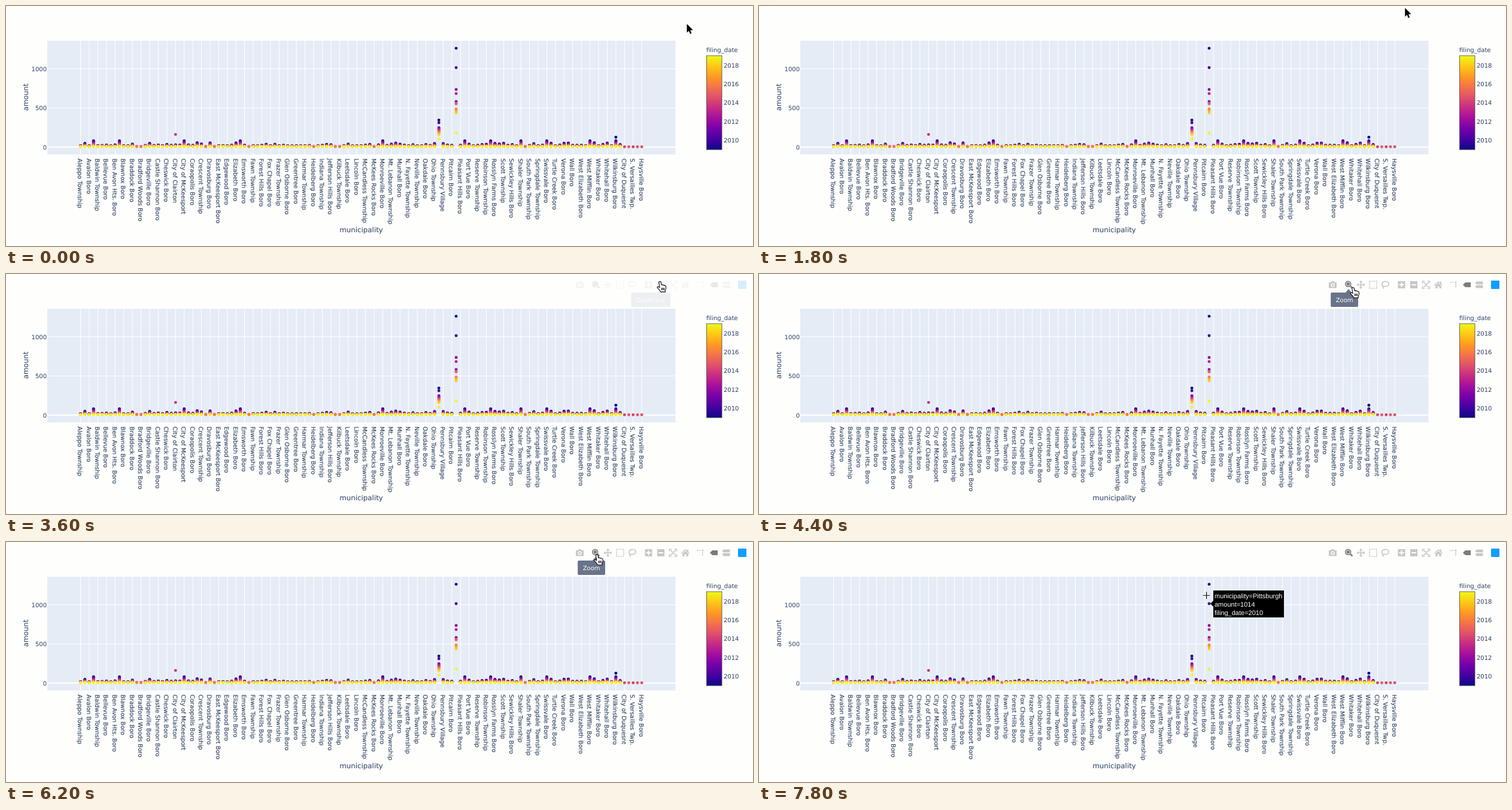
Animation of 1248 by 401 pixels, one loop 8000 ms. Source, as an HTML page:

```html
<!DOCTYPE html>
<html lang="en">
<head>
<meta charset="utf-8">
<title>Filings by municipality</title>
<style>
  html, body { margin: 0; width: 100%; height: 100%; overflow: hidden; background: #fefefd; }
  svg { display: block; width: 1248px; height: 401px; font: 10px "DejaVu Sans", sans-serif; fill: #2a3f5f; text-rendering: geometricPrecision; }
  .title { font-size: 11.85px; text-anchor: middle; }
  .names { font-size: 9.95px; stroke: #2a3f5f; stroke-width: .12px; }
  .icon { fill: #c7c7c7; }
  .icon .line { fill: none; stroke: #c7c7c7; stroke-width: 1.7; }
  .icon.on { fill: #7c7c7c; }
  .hover { font: 11px "Liberation Sans", Arial, sans-serif; fill: #fff; }
</style>
</head>
<body>
<svg id="stage" viewBox="0 0 1248 401">
  <defs><linearGradient id="plasma" x1="0" y1="1" x2="0" y2="0"></linearGradient></defs>
  <rect x="69" y="58" width="1049.5" height="190" fill="#e5ecf6"/>
  <g id="grid" stroke="#fff"></g>
  <g id="dots"></g>
  <g id="names" class="names"></g>
  <g id="scale"></g>
  <text class="title" x="593.5" y="378">municipality</text>
  <text class="title" transform="translate(37.3 152.5) rotate(-90)">amount</text>
  <text x="1170" y="77" font-size="10.1">filing_date</text>
  <rect x="1170.5" y="83" width="25.5" height="157" fill="url(#plasma)" stroke="#444" stroke-width=".8"/>
  <g id="bar"></g>
  <g id="tip">
    <path id="tipArrow" fill="#69738a" d="M-6 32L0 25L6 32Z"/>
    <rect id="tipBox" y="31" height="24" rx="2" fill="#69738a"/>
    <text id="tipText" y="47" fill="#fff" text-anchor="middle"></text>
  </g>
  <g id="hover" class="hover">
    <path d="M754 103L759 98V81H877V126H759V108Z" fill="#000"/>
    <text x="761" y="93.5">municipality=Pittsburgh</text>
    <text x="761" y="107.5">amount=1014</text>
    <text x="761" y="122">filing_date=2010</text>
  </g>
  <g id="cursor">
    <path id="arrow" d="M0 0V14.6L3.3 11.5L5.6 16.7L7.9 15.7L5.7 10.6L10.3 10.3Z" fill="#000" stroke="#fff" paint-order="stroke"/>
    <path id="hand" d="M-1.8 1.2Q0 -1 1.7 1.2L2.6 5.8Q4.2 4.6 5.2 6.2Q7 5.2 7.8 7Q9.6 6.4 10 8.4Q10.6 12 8.8 14.6V17.4H1.4Q-.6 13.8 -4.2 10.6Q-5 8.6 -3 8.6L-.4 10Z M3 10.5V14.5M5 10.5V14.5M7 10.5V14.5" fill="#fff" stroke="#000" stroke-width="1.1" stroke-linejoin="round"/>
    <g id="cross" fill="none">
      <path d="M-6.5 0H6.5M0 -6.5V6.5" stroke="#fff" stroke-width="2.6"/>
      <path d="M-6 0H6M0 -6V6" stroke="#000" stroke-width="1.2"/>
    </g>
  </g>
</svg>
<script>
const $ = id => document.getElementById(id);
const show = (id, on) => { $(id).style.display = on ? '' : 'none'; };
const columnX = i => 124.6 + i * 7.212;
const amountY = amount => 235.8 - amount * .131;

// Every second column is labelled: B = Boro, T = Township.
const names = `Aleppo T,Avalon B,Baldwin T,Bellevue B,Ben Avon Hts. B,Blawnox B,Braddock B,Bradford Woods B,
Bridgeville B,Castle Shannon B,Cheswick B,City of Clairton,City of McKeesport,Coraopolis B,Crescent T,Dravosburg B,
East McKeesport B,Edgewood B,Elizabeth B,Emsworth B,Fawn T,Forest Hills B,Fox Chapel B,Frazer T,Glen Osborne B,
Greentree B,Harmar T,Heidelberg B,Indiana T,Jefferson Hills B,Kilbuck T,Leetsdale B,Lincoln B,McCandless T,
McKees Rocks B,Monroeville B,Mt. Lebanon T,Munhall B,N. Fayette T,Neville T,Oakdale B,Ohio T,Pennsbury Village,
Pitcairn B,Pleasant Hills B,Port Vue B,Reserve T,Robinson T,Rosslyn Farms B,Scott T,Sewickley Hills B,Shaler T,
South Park T,Springdale T,Swissvale B,Turtle Creek B,Verona B,Wall B,West Elizabeth B,West Mifflin B,Whitaker B,
Whitehall B,Wilkinsburg B,City of Duquesnt,S. Versailles Twp.,Haysville B`
  .split(/,\s*/).map(n => n.replace(/ B$/, ' Boro').replace(/ T$/, ' Township'));

$('names').innerHTML = names.map((n, i) =>
  `<text transform="translate(${columnX(2 * i) - 4.5} 254.8) rotate(90)">${n}</text>`).join('');
$('grid').innerHTML =
  names.map((n, i) => `<path d="M${columnX(2 * i)} 58V248"/>`).join('') +
  [0, 500, 1000].map(v => `<path d="M69 ${amountY(v)}H1118.5" stroke-width="${v ? 1 : 1.9}"/>`).join('');

// Year colours
const stops = ['#0d0887', '#4600a2', '#7500aa', '#a30e9f', '#c72a86', '#e0506a', '#f5724b', '#ff9a22', '#ffc814', '#f0f91b'];
const channels = hex => [1, 3, 5].map(k => parseInt(hex.slice(k, k + 2), 16));
function yearColor(year) {
  const p = (year - 2009) * .9, k = Math.min(8, Math.floor(p));
  const a = channels(stops[k]), b = channels(stops[k + 1]);
  return `rgb(${a.map((v, c) => Math.round(v + (b[c] - v) * (p - k)))})`;
}
$('plasma').innerHTML = stops.map((c, k) => `<stop offset="${k / 9}" stop-color="${c}"/>`).join('');
$('scale').innerHTML =
  [2010, 2012, 2014, 2016, 2018].map(y => `<text x="1199" y="${228.2 - (y - 2010) * 15.7}">${y}</text>`).join('') +
  [0, 500, 1000].map(v => `<text x="68" y="${amountY(v) + 3.8}" text-anchor="end">${v}</text>`).join('');

// Small towns get seeded amounts that decay by year; a few towns stand out.
const COLUMNS = 131, PENN = 83, CITY = 87;
const tall = new Set([3, 9, 24, 37, 70, 89, 95, 102, 108, 118, 124]);
const random = seed => Math.abs(Math.sin(seed * 12.9898) * 43758.5453) % 1;
const dot = (i, amount, year) =>
  `<circle cx="${columnX(i)}" cy="${amountY(amount)}" r="2.45" fill="${yearColor(year)}"/>`;

function town(i) {
  if (i > 125) return dot(i, 4, 2014 + random(i));
  const late = !tall.has(i) && random(i + 500) < .16;
  const peak = tall.has(i) ? 75 : late ? 4 : 12 + 38 * random(i) ** 3;
  let out = '';
  for (let k = late ? 5 : 0; k <= (late ? 7 : 10); k++)
    out += dot(i, 6 + peak * (1 - k / 10) ** 1.4, 2009 + k);
  return out;
}
const series = (i, amounts) => amounts.map((a, k) => dot(i, a, 2009 + k)).join('');
const cityAmounts = [1261, 1014, 580, 735, 683, 563, 552, 485, 465, 438, 182];
const pennAmounts = Array.from({ length: 11 }, (_, k) => k < 2 ? 345 - 34 * k : 246 - 12 * (k - 2) - (k === 10 ? 48 : 0));

$('dots').innerHTML =
  Array.from({ length: COLUMNS }, (_, i) => i === PENN || i === CITY ? '' : town(i)).join('') +
  dot(22, 162, 2013.6) + dot(124, 126, 2009) + series(PENN, pennAmounts) + series(CITY, cityAmounts);

// Toolbar: groups of evenly spaced buttons
const line = d => `<path class="line" d="${d}"/>`;
const solid = d => `<path fill-rule="evenodd" d="${d}"/>`;
const groups = [
  [958.5, [['Download plot as a png', solid('M-6.5 -4H-3L-2 -6H2L3 -4H6.5V5.5H-6.5ZM0 -2.8A3.3 3.3 0 1 0 .1 -2.8Z') + '<circle cy=".6" r="1.8"/>']]],
  [985, [
    ['Zoom', '<circle cx="-.8" cy="-1.2" r="5.3"/>' + solid('M2 3L4 1.2L7.3 5L5.5 6.5Z') + '<circle cx="-.8" cy="-1.2" r="3.3" fill="none" stroke="#fefefd" stroke-width=".9"/>', 'on'],
    ['Pan', line('M-5 0H5M0 -5V5') + solid('M-7 0L-4 -3V3ZM7 0L4 -3V3ZM0 -7L-3 -4H3ZM0 7L-3 4H3Z')],
    ['Box Select', '<rect class="line" x="-6" y="-6" width="12" height="12" stroke-dasharray="2 1.43"/>'],
    ['Lasso Select', line('M-3.5 3C-8 -1 -5 -6 1 -5.5C7 -5 7 1 2 2.5C-1 3.5 -4 1.5 -4.5 3.5Q-4 5 -3 6.5')]]],
  [1073.5, [
    ['Zoom in', solid('M-6 -6H6V6H-6ZM-1 -4V-1H-4V1H-1V4H1V1H4V-1H1V-4Z')],
    ['Zoom out', solid('M-6 -6H6V6H-6ZM-4 -1V1H4V-1Z')],
    ['Autoscale', line('M-6 -2.5V-6H-2.5M2.5 -6H6V-2.5M6 2.5V6H2.5M-2.5 6H-6V2.5M-4 -4L4 4M4 -4L-4 4')],
    ['Reset axes', solid('M-7 .5L0 -6L3 -3.2V-5.5H5V-1.3L7 .5L6 1.5L0 -4L-6 1.5ZM-4.8 1.5L0 -2.8L4.8 1.5V6H1.5V2.5H-1.5V6H-4.8Z')]]],
  [1160, [['Toggle Spike Lines', line('M-5.5 -4H-3.3M-1.9 -4H.3M4 -1.5V.7M4 2.1V4.3') + '<circle cx="4" cy="-4" r="1.5"/>']]],
  [1182.5, [
    ['Show closest data on hover', solid('M-6.5 0L-2.5 -4H6.5V4H-2.5Z'), 'on'],
    ['Compare data on hover', solid('M-6.5 -3L-4 -5.5H6.5V-.8H-4.5ZM-6.5 3L-4.5 .8H6.5V5.5H-4Z')]]]
];
const buttons = groups.flatMap(([x, list]) =>
  list.map(([label, shape, state = ''], k) => ({ x: x + k * 20.5, label, shape, state })));
$('bar').innerHTML = buttons.map(b =>
  `<g class="icon ${b.state}" transform="translate(${b.x} 18)">${b.shape}</g>`).join('') +
  '<rect x="1223" y="11" width="14" height="14" rx="1" fill="#119dff"/>';

function drawTip(x) {
  const near = buttons.reduce((a, b) => Math.abs(b.x - x) < Math.abs(a.x - x) ? b : a);
  $('tipText').textContent = near.label;
  const width = $('tipText').getComputedTextLength() + 17, right = near.x + 16;
  $('tipText').setAttribute('x', right - width / 2);
  $('tipBox').setAttribute('x', right - width);
  $('tipBox').setAttribute('width', width);
  $('tipArrow').setAttribute('transform', `translate(${near.x})`);
}

// Pointer key points: time, x, y
const path = [[0, 1137.5, 30], [1000, 1088.5, 5], [1600, 1081, 1], [2800, 1070.5, 14.5],
  [3600, 1092.5, 12.5], [4200, 993, 22.5], [6600, 986, 20.5], [7600, 748, 89], [8000, 747.2, 89.5]];
function pointerAt(t) {
  const k = Math.max(1, path.findIndex(p => p[0] >= t));
  const [t0, x0, y0] = path[k - 1], [t1, x1, y1] = path[k];
  const f = (t - t0) / (t1 - t0);
  return [x0 + (x1 - x0) * f, y0 + (y1 - y0) * f];
}

function draw(t) {
  const [x, y] = pointerAt(t);
  const hand = t >= 3600 && t <= 6600, cross = y > 58, fading = t < 3800;
  $('cursor').setAttribute('transform', `translate(${x} ${y})`);
  show('hand', hand);
  show('cross', cross);
  show('arrow', !hand && !cross);
  show('bar', t >= 3600);
  show('tip', hand);
  show('hover', t >= 7600);
  $('bar').style.opacity = fading ? .16 : 1;
  $('tip').style.opacity = fading ? .1 : 1;
  if (hand) drawTip(x);
}

const start = performance.now();
function tick() {
  const t = (performance.now() - start) % 8000;
  draw(Math.floor(t / 200) * 200);
  requestAnimationFrame(tick);
}
tick();
</script>
</body>
</html>
```
